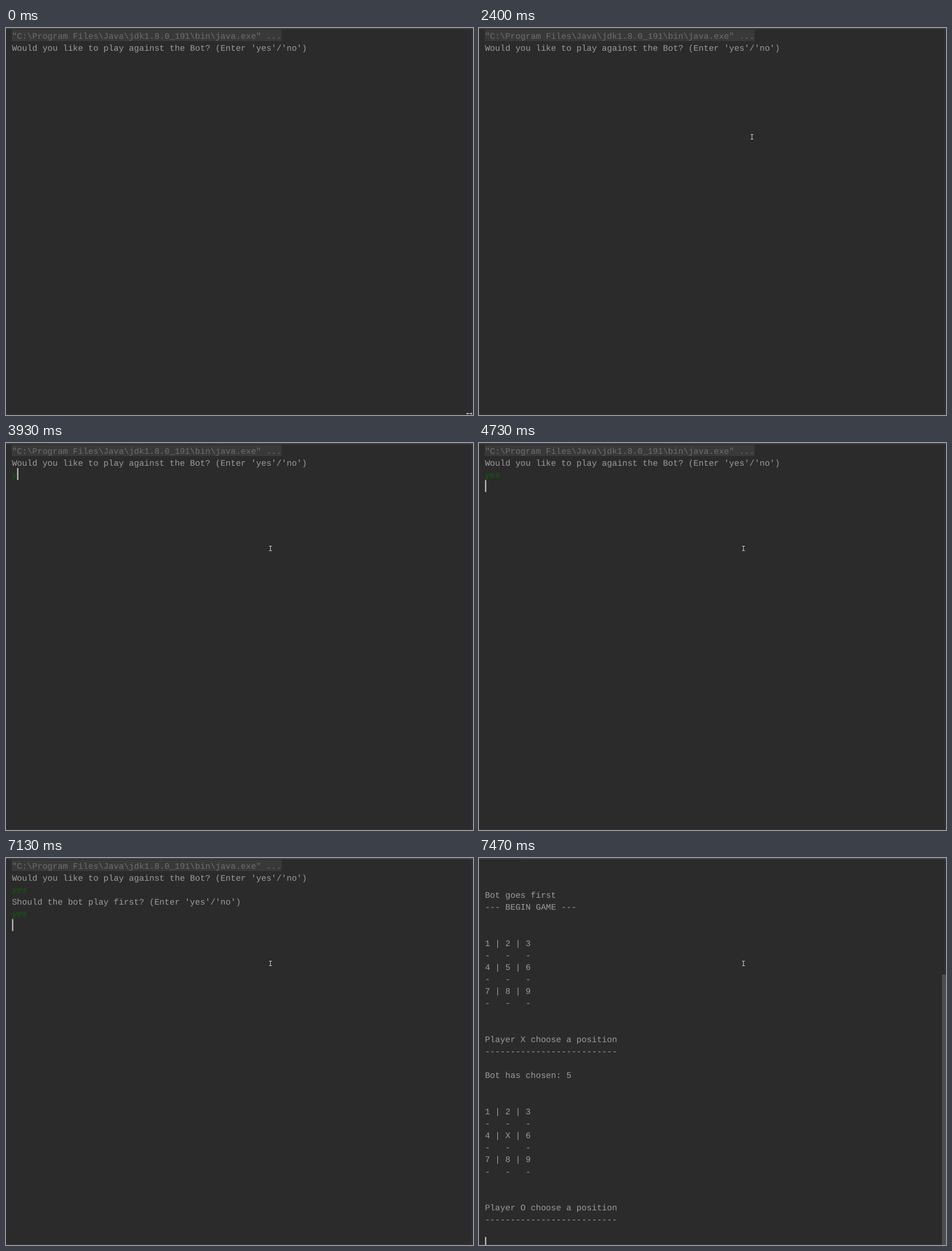
An HTML page with a canvas for the animation above (8000 ms loop, 822 by 681 pixels).

```html
<!DOCTYPE html>
<html lang="en">
<head>
<meta charset="utf-8">
<title>Console</title>
<style>
  html, body { margin: 0; width: 100%; height: 100%; overflow: hidden; background: #2b2b2b; }
  canvas { display: block; }
</style>
</head>
<body>
<canvas id="stage" width="822" height="681"></canvas>
<script>
const ctx = document.getElementById('stage').getContext('2d');
const W = 822, H = 681, LOOP = 8000;
const LEFT = 10.4, TOP = 2, CHAR = 8.96, LINE = 21.15;
const FONT = '14.93px "Liberation Mono", "Courier New", monospace';
const TEXT = '#9c9c9c', FADED = '#6e6e6e', INPUT = '#0f600f';
const CARET = '#c4c4c4', POINTER = '#d0d0d0';

const command = '"C:\\Program Files\\Java\\jdk1.8.0_191\\bin\\java.exe" ...';
const rule = '-'.repeat(26);
const board = cells => [0, 3, 6].flatMap(i => [[...cells].slice(i, i + 3).join(' | '), '-   -   -']);
const game = [
  'Bot goes first', '--- BEGIN GAME ---', '', '',
  ...board('123456789'), '', '',
  'Player X choose a position', rule, '',
  'Bot has chosen: 5', '', '',
  ...board('1234X6789'), '', '',
  'Player O choose a position', rule
];

// Key times for y, e, s and Enter
const answers = [
  { row: 2, keys: [3930, 4000, 4200], enter: 4730 },
  { row: 4, keys: [6530, 6670, 6800], enter: 7130 }
];
const caretOn = [[3070, 3470], [3930, 5470], [6000, 6470], [6530, 7400], [7470, LOOP]];

function rect(x, y, w, h, color) {
  ctx.fillStyle = color;
  ctx.fillRect(x, y, w, h);
}

function write(str, row, color = TEXT, style = '') {
  ctx.font = style + FONT;
  ctx.fillStyle = color;
  ctx.fillText(str, LEFT, TOP + row * LINE + 16.5);
}

function drawCaret(row, col) {
  rect(LEFT + 0.2 + col * CHAR, TOP + row * LINE - 0.2, 2.2, 21, CARET);
}

function drawFrame(t) {
  rect(0, 0, W, H, '#2b2b2b');
  rect(0, 679, W, 2, '#303030');
  rect(819, 2, 3, H - 2, '#303030');
  rect(0, 0, W, 2, '#3c3f41');
  if (t >= 3000) rect(75, 0, W - 75, 2, '#3d4752');
}

function drawIBeam(x, y) {
  rect(x, y - 4, 1, 9, POINTER);
  for (const dy of [-4, 4]) rect(x - 2, y + dy, 5, 1, POINTER);
}

function drawResize(x, y) {
  rect(x - 4, y, 9, 1, POINTER);
  for (const dir of [-1, 1]) {
    ctx.beginPath();
    ctx.moveTo(x + 0.5 + dir * 5.5, y + 0.5);
    ctx.lineTo(x + 0.5 + dir * 3, y - 1.5);
    ctx.lineTo(x + 0.5 + dir * 3, y + 2.5);
    ctx.fill();
  }
}

function drawPointer(t) {
  if (t < 670) {
    rect(813, 2, 1, H - 2, '#313131');
    drawResize(815, 678);
  } else if (t >= 2470) drawIBeam(465, 185);
  else if (t >= 2400) drawIBeam(480, 191);
}

// Returns the caret's row and column
function drawSetup(t) {
  rect(10, 3, 475, 20, '#393939');
  write(command, 0, FADED);
  write("Would you like to play against the Bot? (Enter 'yes'/'no')", 1);
  const asked = t >= 4870;
  if (asked) write("Should the bot play first? (Enter 'yes'/'no')", 3);

  let caret = [asked ? 4 : 2, 0];
  for (const { row, keys, enter } of answers) {
    const typed = keys.filter(k => t >= k).length;
    if (!typed) continue;
    write('yes'.slice(0, typed), row, INPUT, 'italic ');
    caret = t < enter ? [row, typed] : [Math.max(caret[0], row + 1), 0];
  }
  return caret;
}

function drawGame(t) {
  const first = (53.6 - TOP) / LINE;
  game.forEach((line, i) => write(line, first + i));
  if (t >= 7470) rect(815, 205, 7, H - 205, '#4d4d4d');
  return [first + 29, 0];
}

function draw(t) {
  drawFrame(t);
  const caret = t < 7400 ? drawSetup(t) : drawGame(t);
  if (caretOn.some(([a, b]) => t >= a && t < b)) drawCaret(...caret);
  drawPointer(t);
}

ctx.textRendering = 'geometricPrecision';
const start = performance.now();
function tick() {
  draw((performance.now() - start) % LOOP);
  requestAnimationFrame(tick);
}
tick();
</script>
</body>
</html>
```
